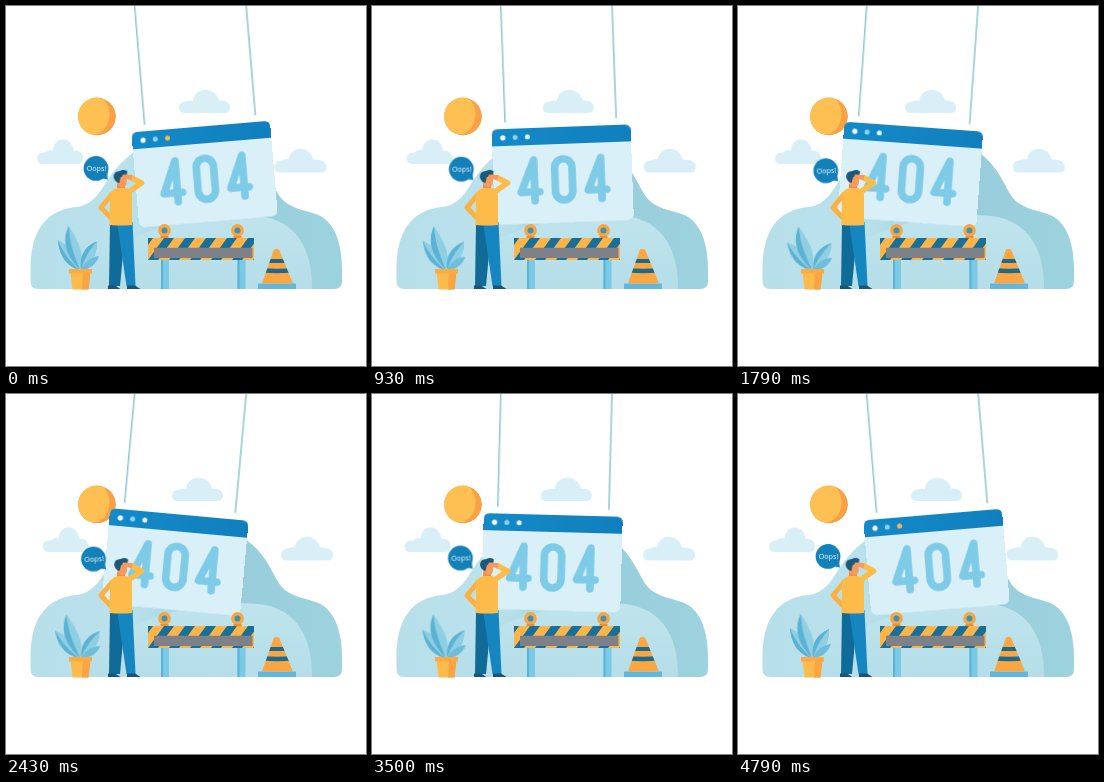
An HTML page for the animation above (4.87 s loop, 360 px wide and 360 px high).

```html
<!DOCTYPE html>
<html lang="en">
<head>
<meta charset="utf-8">
<title>404</title>
<style>
  html, body { margin: 0; width: 100%; height: 100%; overflow: hidden; background: #fff; }
  svg { display: block; width: 100vw; height: 100vh; }
  #sign { transform-origin: 184.4px 0; }
  #bubble { transform-origin: 90px 162.4px; }
  .leaf { transform-origin: 74px 264px; }
  #head { transform-origin: 115px 182px; }
</style>
</head>
<body>
<svg viewBox="0 0 360 360">
  <defs>
    <linearGradient id="ridge" x1="24" x2="336" y1="0" y2="0" gradientUnits="userSpaceOnUse">
      <stop offset="0" stop-color="#b7dfe9"/>
      <stop offset=".3" stop-color="#bbe2ec"/>
      <stop offset=".68" stop-color="#98cedb"/>
      <stop offset="1" stop-color="#9dd2df"/>
    </linearGradient>
    <linearGradient id="slope" x1="0" x2="0" y1="205" y2="283" gradientUnits="userSpaceOnUse">
      <stop offset="0" stop-color="#c0e4ed"/>
      <stop offset="1" stop-color="#b5dee8"/>
    </linearGradient>
    <linearGradient id="header" x1="0" x2="1">
      <stop offset="0" stop-color="#148ac8"/>
      <stop offset="1" stop-color="#117fbd"/>
    </linearGradient>
    <clipPath id="disc"><circle cx="91" cy="110.5" r="19"/></clipPath>
    <clipPath id="board"><path d="M142 232H248V254H142Z"/></clipPath>
    <clipPath id="coneShape"><path d="M268 243.500Q270.500 242.500 273 243.500L287 277.500H256Z"/></clipPath>
    <path id="four" d="M4.500 20.500V-20.500L-9 11.500H9.500"/>
  </defs>

  <g fill="#d9eff7">
    <path id="cloudTop" d="M173 102Q173 95.500 180 95.500Q184 94 187 95C188 81 209 79 213 94.500Q224 94 224 102Q224 107 218 107H179Q173 107 173 102Z"/>
    <path id="cloudLeft" d="M31 152.500Q31 146 39 146.500Q43 143 46.500 144.500C48 130 65 129 67.500 144.500Q77 144.500 77 152.500Q77 158 71 158H37Q31 158 31 152.500Z"/>
    <path id="cloudRight" d="M268 161Q268 154.500 275 154.500Q279 152 282 153.500C284 139.500 303 139 307 153.500Q320 153 320 161Q320 166.500 314 166.500H274Q268 166.500 268 161Z"/>
  </g>

  <g clip-path="url(#disc)">
    <circle cx="91" cy="110.5" r="19" fill="#fba145"/>
    <ellipse cx="86.500" cy="108.500" rx="17" ry="20" fill="#fec052"/>
  </g>

  <path fill="url(#ridge)" d="M24.500 265C24 225 40 204 70 201C89 199 95 183 103 172C109 163 118 153 128 146C146 134 170 128 190 128C213 128 230 136 243 148C262 163 266 180 275 192C284 203 299 204 311 208.500C330 216 336 240 336 263V275Q336 283 328 283H32Q24.500 283 24.500 275Z"/>
  <path fill="url(#slope)" d="M70 283C90 240 165 207 245 209.500C287 210 307 240 306 283Z"/>

  <g id="sign">
    <path d="M128.800 -20V114.500M240 -20V114.500" stroke="#86c3d2" stroke-width="1.400"/>
    <rect x="115" y="121" width="139" height="95.500" rx="6" fill="#daf0f9"/>
    <path d="M115 138V127Q115 121 121 121H248Q254 121 254 127V138Z" fill="url(#header)"/>
    <circle cx="126" cy="129.800" r="2.600" fill="#fff"/>
    <circle cx="138.300" cy="129.800" r="2.500" fill="#8fd3ee"/>
    <circle id="dot" cx="150.600" cy="129.800" r="2.500"/>
    <g role="img" aria-label="404" fill="none" stroke="#7ecbe7" stroke-width="7.600" stroke-linecap="round" stroke-linejoin="round">
      <use href="#four" x="151.500" y="173.500"/>
      <rect x="176.700" y="153" width="17.300" height="41" rx="8.650"/>
      <use href="#four" x="218.500" y="173.500"/>
    </g>
  </g>

  <g id="bubble">
    <circle cx="90" cy="162.400" r="12.400" fill="#1280b9"/>
    <path d="M101 165L102 173.500L95 172Z" fill="#1280b9"/>
    <text x="90.500" y="164.700" text-anchor="middle" font-family="'Open Sans', sans-serif" font-size="7.200" fill="#fff">Oops!</text>
  </g>

  <g id="man">
    <path d="M104 216H120L114 280H103Z" fill="#106b99"/>
    <path d="M111 216H126.500L129.500 280H120.500Z" fill="#1586c0"/>
    <path d="M102 283V279.500H109L114.500 283ZM121 283V279.500H129L134.500 283Z" fill="#17557a"/>
    <path d="M107 187L95 201.500L105 212" fill="none" stroke="#fbb03f" stroke-width="5" stroke-linejoin="round"/>
    <path d="M111 178H119V186H111Z" fill="#f18b4e"/>
    <path d="M104 188Q106 183 112 182H120Q126 183 126 190L126 219Q115 220 103.500 219Z" fill="#fdbb4a"/>
    <g id="head">
      <path d="M110.500 170H121V177Q120 181.500 116 181Q111.500 180 110.500 175Z" fill="#f79a5b"/>
      <path d="M108 171Q108 165 114.500 165Q118 163 122 165.500L121 170L115 171L113.500 177Q109 176 108 171Z" fill="#1a587c"/>
    </g>
    <path d="M121 187L135.500 177L125 171.500" fill="none" stroke="#fdbb48" stroke-width="5.600" stroke-linejoin="round"/>
    <path d="M125.500 174.500L116 171L117 168.500L126.500 169Z" fill="#f79a5b"/>
  </g>

  <g id="plant">
    <g class="leaf" id="leafLeft">
      <path d="M52 234C53 252 63 261 73 264C71 250 63 239 52 234Z" fill="#8fcfe3"/>
      <path d="M52 234C53 252 63 261 73 264C65 256 57 247 52 234Z" fill="#5bb2d5"/>
    </g>
    <g class="leaf" id="leafMid">
      <path d="M62 220C54 238 62 252 74 264C79 249 73 237 62 220Z" fill="#8fcfe3"/>
      <path d="M62 220C54 238 62 252 74 264C69 251 63 239 62 220Z" fill="#5bb2d5"/>
    </g>
    <g class="leaf" id="leafRight">
      <path d="M91 235C77 241 73 252 75 264C86 258 91 249 91 235Z" fill="#5bb2d5"/>
      <path d="M91 235C82 246 78 254 75 264C86 258 91 249 91 235Z" fill="#8fcfe3"/>
      <path d="M93 250C84 251 78 257 75 264C84 263 90 259 93 250Z" fill="#6dbddb"/>
    </g>
    <path d="M64.500 266H84.500L82.500 283.500H66.500Z" fill="#fdbb4c"/>
    <path d="M77 266H84.500L82.500 283.500H76Z" fill="#faa442"/>
    <path d="M63 263H86V267.500H63Z" fill="#fbaa44"/>
  </g>

  <g id="barrier">
    <path d="M155 253H163V283H155ZM231.500 253H239.500V283H231.500Z" fill="#79c9e7"/>
    <path d="M155 253H157V283H155ZM231.500 253H233.500V283H231.500Z" fill="#58b3d9"/>
    <g fill="#3f92b4" stroke="#f9a640" stroke-width="3.400">
      <circle cx="158.500" cy="224.500" r="4.700"/>
      <circle cx="231.500" cy="224.500" r="4.700"/>
    </g>
    <path d="M154.500 230H162.500V232.500H154.500ZM227.500 230H235.500V232.500H227.500Z" fill="#e98f38"/>
    <g clip-path="url(#board)">
      <path d="M142 232H248V254H142Z" fill="#fdb54a"/>
      <g id="stripes" fill="#186f98"></g>
      <path d="M148 241.700H246.500V252H148Z" fill="#7e8187"/>
    </g>
  </g>

  <g id="cone">
    <path d="M252 277.500H290V283H252Z" fill="#5fb9de"/>
    <g clip-path="url(#coneShape)">
      <path d="M250 240H292V278H250Z" fill="#fba640"/>
      <path d="M250 252Q271 254 292 252V256Q271 258 250 256ZM250 261.500Q271 264 292 261.500V266Q271 268.500 250 266Z" fill="#1b6b90"/>
    </g>
  </g>
</svg>

<script>
  const LOOP = 4870;
  const SWING = 'cubic-bezier(.53, 0, .47, 1)';
  const SINE = 'cubic-bezier(.37, 0, .63, 1)';
  const el = id => document.getElementById(id);

  const stripes = el('stripes');
  for (let x = 137; x < 275; x += 21) {
    const bar = document.createElementNS(stripes.namespaceURI, 'path');
    bar.setAttribute('d', `M${x} 232h10l-16 22h-10Z`);
    stripes.append(bar);
  }

  // [id, start pose, opposite pose, easing, head start in ms]
  const moves = [
    ['sign', 'rotate(-4.8deg)', 'rotate(5.25deg)', SWING, 0],
    ['bubble', 'translate(0, 0) rotate(1deg)', 'translate(-2.5px, 2.6px) rotate(-3deg)', SWING, 0],
    ['cloudTop', 'translateX(0)', 'translateX(-7px)', SINE, 0],
    ['cloudLeft', 'translateX(-.3px)', 'translateX(6.2px)', SINE, 435],
    ['cloudRight', 'translateX(.2px)', 'translateX(7.2px)', SINE, 285],
    ['leafLeft', 'rotate(0deg)', 'rotate(-6deg)', SWING, 100],
    ['leafMid', 'rotate(1deg)', 'rotate(-2deg)', SWING, 100],
    ['leafRight', 'rotate(0deg)', 'rotate(6deg)', SWING, 100],
    ['head', 'rotate(-2deg)', 'rotate(1deg)', SWING, 0],
  ];

  for (const [id, from, to, easing, lead] of moves) {
    el(id).animate([{ transform: from, easing }, { transform: to, easing }, { transform: from }],
      { duration: LOOP, delay: -lead, iterations: Infinity });
  }

  el('dot').animate([
    { fill: '#fdb54a', offset: 0, easing: 'step-end' },
    { fill: '#e4f4fb', offset: .13, easing: 'step-end' },
    { fill: '#fdb54a', offset: .78, easing: 'step-end' },
    { fill: '#fdb54a', offset: 1 },
  ], { duration: LOOP, iterations: Infinity });
</script>
</body>
</html>
```
